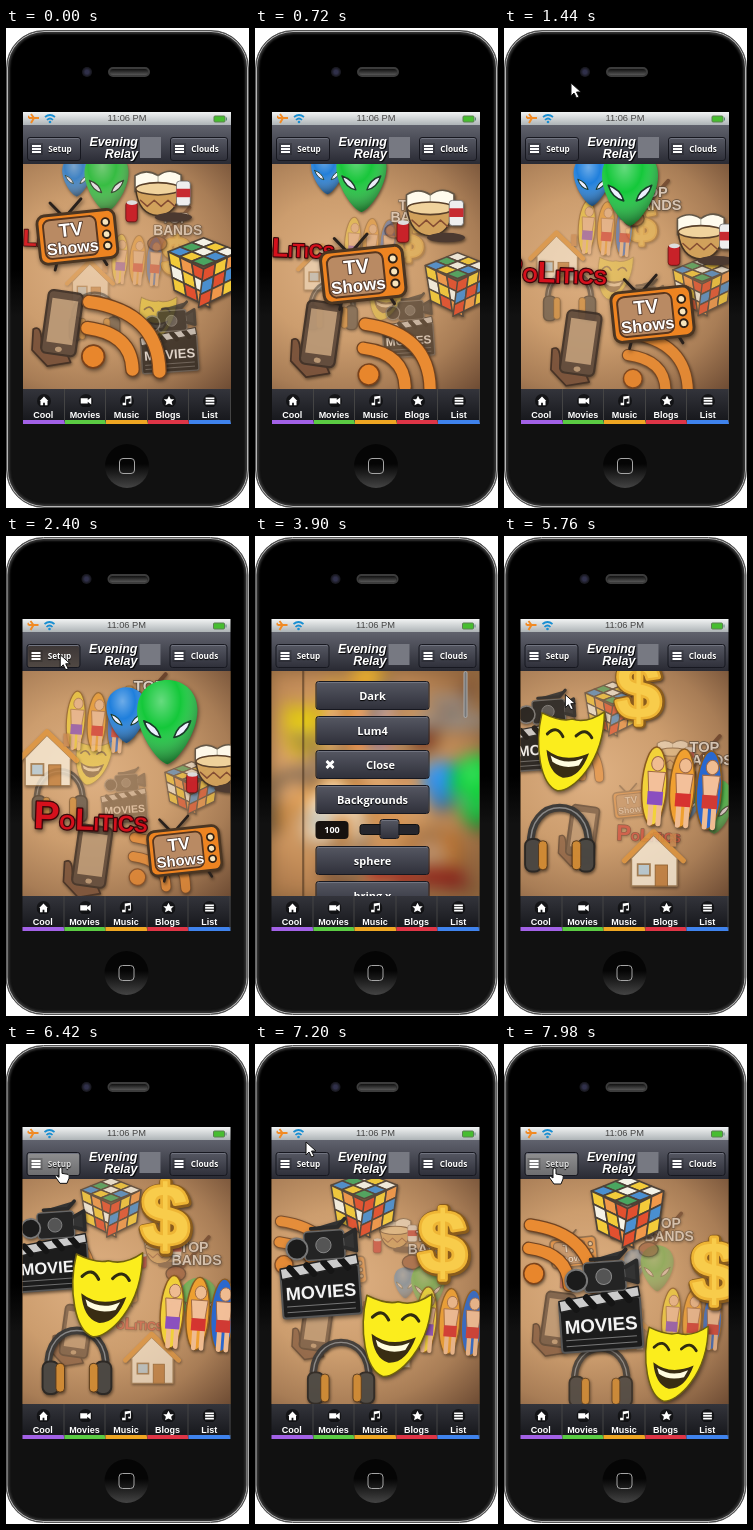
These frames come from a looping animation (243 px wide and 480 px high, 8000 ms). An HTML page:

```html
<!DOCTYPE html>
<html lang="en">
<head>
<meta charset="utf-8">
<title>Phone with icon sphere</title>
<style>
html, body { margin: 0; width: 100%; height: 100%; overflow: hidden; background: #fff; }
#stage { position: relative; width: 243px; height: 480px; overflow: hidden; background: #fff; }
#stage * { box-sizing: border-box; }
#stage div, #stage svg { position: absolute; }
#phone { inset: 0; }
.body { left: 0; top: 2px; width: 243px; height: 478px; border-radius: 38px; background: linear-gradient(#000 50%, #111 60%);
  border: 1px solid #555; box-shadow: inset 0 0 0 1px #b5b5b5, inset 0 0 2px 3px #333; }
.camera { left: 76px; top: 39px; width: 10px; height: 10px; border-radius: 50%; background: radial-gradient(#30304a 25%, #191921 60%); }
.speaker { left: 102px; top: 39px; width: 42px; height: 10px; border-radius: 5px; background: linear-gradient(#111, #555); border: 2px solid #3c3c3c; }
.home { left: 99px; top: 416px; width: 44px; height: 44px; border-radius: 50%; background: linear-gradient(#050505 45%, #444); }
.home div { left: 14px; top: 14px; width: 16px; height: 16px; border: 1.5px solid #a5a5a5; border-radius: 4px; }
.status { left: 17px; top: 84px; width: 208px; height: 13px; background: linear-gradient(#f1f3f3, #aeb4b7);
  font: 9.3px/13px "Liberation Sans", Arial, sans-serif; text-align: center; color: #444; }
.head { left: 17px; top: 97px; width: 208px; height: 39px; background: linear-gradient(#60626d, #292a33); }
.btn { border: 1px solid #171820; border-radius: 3px; background: linear-gradient(#555762, #30313b);
  box-shadow: inset 0 1px #717480; color: #fff; text-align: center; font: 700 11px/27px "Open Sans", sans-serif; text-shadow: 0 1px 1px #000; }
.top { top: 109px; height: 24px; font-size: 8.2px; line-height: 22px; padding-left: 12px; }
.top::before { content: ""; position: absolute; left: 4px; top: 7px; width: 9px; height: 8px;
  background: repeating-linear-gradient(#fff 0 2px, transparent 2px 3px); box-shadow: 0 0 0 2px #0003; }
.top.press { background: linear-gradient(#3d3737, #504843); }
.top.hover { background: linear-gradient(#8f8f90, #6e6e70); color: #ddd; }
.title { font: italic 700 12.5px/12px "Liberation Sans", Arial, sans-serif; color: #fff; text-align: right; text-shadow: 1px 1px 1px #000; }
.mark { left: 134px; top: 109px; width: 21px; height: 21px; background: #777982; }
#view { left: 17px; top: 136px; width: 208px; height: 225px; overflow: hidden; background: #8f683f; }
#world { inset: 0; background: radial-gradient(ellipse at 34% 46%, #dfb183 0, #cc9d6e 42%, #a87d56 72%, #6e4c34 100%); }
#world svg { left: 0; top: 0; width: 1px; height: 1px; overflow: visible; }
#menu { inset: 0; }
#menu .btn { left: 44px; width: 114px; height: 29px; }
.edge { left: 31px; top: 0; width: 1px; height: 225px; background: #4a321f; box-shadow: 1px 0 1px #0004; }
.bar { left: 192px; top: 0; width: 4px; height: 47px; border-radius: 2px; background: #777; border: 1px solid #aaa; }
.value { left: 44px; top: 150px; width: 33px; height: 18px; border-radius: 4px; background: #17120f; color: #fff; text-align: center; font: 700 9px/18px "Open Sans", sans-serif; }
.track { left: 88px; top: 153px; width: 60px; height: 11px; border-radius: 3px; background: #25262d; border: 1px solid #111; }
#menu .thumb { left: 108px; top: 148px; width: 20px; height: 20px; }
.foot { left: 17px; top: 361px; width: 208px; height: 35px; background: linear-gradient(#33343b, #141519); display: flex; }
#stage .tab { position: relative; width: 20%; height: 35px; border-bottom: 4px solid; border-right: 1px solid #444;
  font: 700 9px/10px "Liberation Sans", Arial, sans-serif; text-align: center; padding-top: 21px; }
.tab span { color: #fff; }
.tab svg { left: 14px; top: 4px; width: 14px; height: 14px; }
#cursor { left: 0; top: 0; width: 20px; height: 22px; overflow: visible; z-index: 9; }
</style>
</head>
<body>
<div id="stage">
  <div id="phone">
    <div class="body"></div><div class="camera"></div><div class="speaker"></div>
    <div class="home"><div></div></div>
    <div class="status">11:06 PM
      <svg style="left:5px;top:1px" width="200" height="11" fill="none">
        <path d="M1 5H11M6 5 3 1M6 5 3 10M1 5 0 3" stroke="#f18a24" stroke-width="2"/>
        <path d="M17 4Q22 0 27 4M19 7Q22 4 25 7" stroke="#188ed2" stroke-width="1.7"/><circle cx="22" cy="9" r="1.3" fill="#188ed2"/>
        <rect x="186" y="3" width="11" height="6" rx="1" fill="#47bd30" stroke="#5a8050"/><path d="M198.500 4.500v3" stroke="#587"/>
      </svg>
    </div>
    <div class="head"></div>
    <div class="btn top" id="setup" style="left:21px;width:54px">Setup</div>
    <div class="btn top" style="left:164px;width:58px">Clouds</div>
    <div class="title" style="left:76px;top:108px;width:56px">Evening<br>Relay</div>
    <div class="mark"></div>
    <div id="view">
      <div id="world"></div>
      <div id="menu">
        <div class="edge"></div><div class="bar"></div>
        <div class="value">100</div><div class="track"></div><div class="btn thumb"></div>
      </div>
    </div>
    <div class="foot" id="tabs"></div>
  </div>
  <svg width="0" height="0"><radialGradient id="shade" cx=".4" cy=".25" r=".8">
    <stop offset="0" stop-color="#fff" stop-opacity=".35"/><stop offset=".4" stop-color="#fff" stop-opacity="0"/>
    <stop offset="1" stop-opacity=".6"/></radialGradient></svg>
  <svg id="cursor"><path id="arrow" d="M0 0V13L3 10 5.500 15 8 14 5.500 9H10Z" fill="#fff" stroke="#111"/>
    <path id="hand" d="M-1 1Q1-1 2 1V6L8 7Q10 8 9 11L7 16H0L-5 9Q-4 7-1 10Z" fill="#fff" stroke="#111"/></svg>
</div>
<script>
const $ = id => document.getElementById(id);
const LOOP = 8000, STEP = 60, RADIUS = 95, DEPTH = 285;

const path = (d, fill, stroke = 'none', w = 1) =>
  `<path d="${d}" fill="${fill}" stroke="${stroke}" stroke-width="${w}" stroke-linejoin="round" stroke-linecap="round"/>`;
const oval = (x, y, rx, ry, fill, stroke = 'none', w = 1) =>
  `<ellipse cx="${x}" cy="${y}" rx="${rx}" ry="${ry}" fill="${fill}" stroke="${stroke}" stroke-width="${w}"/>`;
const box = (x, y, w, h, fill, stroke = 'none', sw = 1, r = 0) =>
  `<rect x="${x}" y="${y}" width="${w}" height="${h}" rx="${r}" fill="${fill}" stroke="${stroke}" stroke-width="${sw}"/>`;
const text = (x, y, size, fill, str, stroke = '#222', w = 2) =>
  `<text x="${x}" y="${y}" text-anchor="middle" font-family="Liberation Sans, Arial, sans-serif" font-weight="700" font-size="${size}" fill="${fill}" stroke="${stroke}" stroke-width="${w}" paint-order="stroke" stroke-linejoin="round">${str}</text>`;
const pose = (deg, size, body) => `<g transform="rotate(${deg}) scale(${size})">${body}</g>`;

// One cube side of 3 by 3 tiles, spanned by two edge vectors.
function side(x, y, ax, ay, bx, by, shift) {
  const tints = ['#f4f2e6', '#e2502f', '#4aa560', '#f3cb3a', '#4a8fd0', '#f0984a'];
  const at = (i, j) => `${x + (ax * i + bx * j) / 3} ${y + (ay * i + by * j) / 3}`;
  let out = '';
  for (let i = 0; i < 3; i++) for (let j = 0; j < 3; j++)
    out += path(`M${at(i, j)}L${at(i + 1, j)} ${at(i + 1, j + 1)} ${at(i, j + 1)}Z`,
      tints[(i * 2 + j * 3 + i * j + shift) % 6], '#4d4238', 1.6);
  return out;
}

function alien(x, y, fill, size) {
  const head = 'M0 38C-10 35-28 8-27-12C-25-46 25-46 27-12C28 8 10 35 0 38Z';
  return `<g transform="translate(${x} ${y}) scale(${size})">` + path(head, fill) + path(head, 'url(#shade)') +
    path('M-21-1Q-9 3-6 14Q-17 12-21-1ZM21-1Q9 3 6 14Q17 12 21-1Z', '#eef', '#1a3a2a', 1.5) + '</g>';
}

const surfer = (x, board, shorts) => oval(x, 0, 12, 38, board, '#8a5a20', 1.5) +
  oval(x + 2, -22, 6, 7, '#f0bc91', '#a06a48') + path(`M${x - 7}-14h17l-2 20h-13Z`, '#f3c09a', '#a06a48') +
  path(`M${x - 2} 18v18M${x + 6} 18v18`, 'none', '#f0bc91', 5) + box(x - 6, 5, 15, 13, shorts);

const capitals = sizes => [...'POLITICS'].map((c, i) => `<tspan font-size="${sizes[i]}">${c}</tspan>`).join('');

const art = {
  tv: pose(-6, .95, path('M-14-24-25-38M-8-24 8-39M-24 25-27 33M24 25 28 33', 'none', '#29211c', 3) +
    box(-41, -25, 82, 51, '#ee8421', '#4a3522', 3, 8) + box(-35, -20, 56, 41, '#b98a63', '#57351e', 2, 7) +
    text(-6, -1, 20, '#fff', 'TV', '#5c4030') + text(-6, 17, 17, '#fff', 'Shows', '#5c4030') +
    [-12, 1, 13].map(y => oval(31, y, 4, 4, '#f7e5bd', '#302015', 2)).join('')),
  politics: pose(2, 1, text(0, 11, 24, '#d5101c', capitals([38, 20, 30, 18, 22, 18, 22, 20]), '#3a0709', 2.5)),
  mask: pose(10, 1, path('M-31-30Q-10-24 0-29Q16-27 31-42C40 10 12 44-2 45C-20 42-33 5-31-30Z', '#fbed1d', '#6f6010', 1.5) +
    path('M-22-10Q-14-21-6-10M7-13Q15-24 23-14', 'none', '#302c10', 3) +
    path('M-20 6Q0 17 23 2Q18 29 1 31Q-14 29-20 6Z', '#392d13') + path('M-15 11Q2 19 18 8L15 16Q0 23-12 17Z', '#fffce0')),
  cube: pose(0, 1.2, side(0, -40, -35, 14, 35, 14, 0) + side(-35, -26, 35, 17, 6, 38, 3) + side(0, -9, 35, -17, -5, 38, 1)),
  handset: pose(8, 1.1, path('M-30 8Q-20 0-18 28L12 30 18 40-8 48-28 32Z', '#775039', '#3c2a20', 2) +
    box(-18, -40, 40, 73, '#5c483a', '#3a2d25', 2.5, 6) + box(-13, -31, 30, 51, '#b99876') + oval(2, 27, 4, 3, '#b99876')),
  feed: pose(4, .92, oval(-29, 28, 13, 13, '#e8862c', '#7a421b', 2) +
    path('M-38-4Q13-1 17 40M-38-34Q42-28 48 40', 'none', '#704321', 17) +
    path('M-38-4Q13-1 17 40M-38-34Q42-28 48 40', 'none', '#e98b32', 14)),
  clapper: pose(-4, 1, box(-41, -16, 82, 52, '#1c1c1c', '#555', 2, 3) + path('M-41-16 40-26 41-16-40-5Z', '#ccc', '#222', 1.5) +
    path('M-31-16l7 9M-13-18l7 9M5-20l7 9M23-22l7 9', 'none', '#151515', 7) +
    box(-14, -53, 42, 30, '#242424', '#666', 1.5, 4) + oval(-22, -36, 11, 11, '#1b1b1b', '#777', 2) +
    path('M-6-56H22L30-64M28-46 40-52V-30L28-34', '#333', '#2a2a2a', 4) + oval(6, -38, 8, 8, '#555', '#888') +
    text(0, 17, 19, '#f4f4f4', 'MOVIES') + path('M-36 24H35M-36 30H35', 'none', '#777', 1)),
  food: pose(0, .88, path('M-30-25Q-15-35 0-25Q15-36 30-26V-4H-30Z', '#fffbed', '#635747', 2) + path('M0-25V-4', 'none', '#998') +
    path('M-29-8H29Q26 25 0 27Q-26 25-29-8Z', '#d1a15b', '#463424', 2) + oval(0, -8, 29, 8, '#f0d39d', '#59402a', 2) +
    path('M-23 7l9 8 9-8 9 8 9-8 9 8', 'none', '#854d32', 2) +
    box(24, -18, 18, 32, '#eee', '#666', 1, 4) + box(24, -8, 18, 11, '#c72b31') +
    box(-42, 9, 15, 26, '#c82229', '#611', 1, 4) + oval(-34, 10, 7, 3, '#ddd') + oval(20, 29, 24, 6, '#4b3930')),
  aliens: alien(-28, -10, '#1f7fdc', .74) + alien(13, -3, '#14c83a', 1.12),
  house: pose(0, 1.2, path('M-25-1V31H27V-1L0-27Z', '#f8ecd8', '#9a7a54', 1.5) + path('M-33 2 0-31 34 2', 'none', '#e0953c', 6) +
    box(2, 7, 14, 24, '#c48242', '#8a5a28') + box(-18, 6, 14, 13, '#b9d5e6', '#9d7a51', 2) + box(19, -29, 7, 15, '#c98850')),
  people: pose(4, 1.15, surfer(-25, '#f2d23a', '#8a4fc0') + surfer(2, '#f0a030', '#d73330') + surfer(28, '#2868d0', '#d23a34')),
  dollar: text(0, 34, 92, '#f2b526', '$', '#8a5c1c', 10) + text(-1, 33, 92, '#f8cc4b', '$', '#eeb535', 6),
  phones: pose(0, 1.15, path('M-30 8C-34-46 34-46 30 8', 'none', '#3c3a38', 8) + path('M-30 8C-34-46 34-46 30 8', 'none', '#888', 1.5) +
    box(-36, 0, 17, 34, '#4a4743', '#2a2724', 2, 7) + box(19, 0, 17, 34, '#4a4743', '#2a2724', 2, 7) +
    box(-22, 2, 9, 30, '#cf8a34', '#54371a', 1, 4) + box(13, 2, 9, 30, '#cf8a34', '#54371a', 1, 4)),
  bands: path('M-34 36 24-30', 'none', '#4d2818', 6) + oval(-30, 30, 16, 12, '#8a4a30', '#392017', 2) +
    text(0, -5, 23, '#eee', 'TOP') + text(4, 16, 23, '#eee', 'BANDS')
};

// Distance along the spin axis and phase, before and after the menu; optional orbit radius.
const orbits = {
  tv: [-5, -.49, -10, -.49], politics: [-35, -1.29, -24, -.98], mask: [-11, -3.85, -11, -3.85],
  cube: [44, .78, 44, 1.05, 66], handset: [-74, -.35, -74, -.35, 32], feed: [-34, .35, -17, .81, 78],
  clapper: [-21, 1.65, -24, 1.71, 82], food: [64, -.48, 64, -.48, 62], aliens: [43, -1.47, 43, -1.47],
  house: [-38, -2.75, -32, -1.9, 72], people: [22, -3.05, 28, -2.83, 70], dollar: [62, -3.5, 62, -4.01],
  phones: [-60, -3.29, -72, -3.45, 45], bands: [82, -3.1, 84, -1.13, 50]
};
const spin = [[0, 0], [1440, .83], [2400, 1.29], [6420, 3.73], [7980, 4.57]];
const visits = [
  [[1260, 74, 0], [1440, 67, 55], [1800, 55, 118], [2580, 54, 119], [2760, 52, 60]],
  [[4680, 76, 2], [4920, 68, 95], [5220, 75, 228], [5520, 76, 228], [5880, 54, 124],
   [6720, 54, 123], [7020, 52, 72], [7380, 50, 124], [8000, 50, 124]]
];

function along(track, t) {
  let i = 1;
  while (i < track.length - 1 && t > track[i][0]) i++;
  const [a, b] = [track[i - 1], track[i]], k = (t - a[0]) / (b[0] - a[0]);
  return a.slice(1).map((v, n) => v + (b[n + 1] - v) * k);
}
const clamp = (v, lo = 0, hi = 1) => Math.min(hi, Math.max(lo, v));

$('world').innerHTML = Object.keys(art).map(n =>
  `<svg id="${n}" style="filter:drop-shadow(1px 2px 2px #0008)">${art[n]}</svg>`).join('');
$('menu').insertAdjacentHTML('beforeend', ['Dark', 'Lum4', 'Close', 'Backgrounds', 'sphere', 'bring x'].map((name, i) =>
  `<div class="btn" style="top:${10 + 34.7 * i + (i > 3 ? 26 : 0)}px;${i === 2 ? 'padding-left:16px' : ''}">${
    i === 2 ? '<svg style="left:9px;top:9px" width="9" height="9"><path d="M1 1 8 8M8 1 1 8" stroke="#fff" stroke-width="3"/></svg>' : ''}${name}</div>`).join(''));
$('tabs').innerHTML = [
  ['Cool', '#a261e6', 'M2 7 7 2 12 7H11V12H8V9H6V12H3V7Z'],
  ['Movies', '#5bcb43', 'M1 4H9V6L13 3V11L9 8V10H1Z'],
  ['Music', '#efa622', 'M5 2 12 1V10H9V8H11V4L6 5V12H2V9H5Z'],
  ['Blogs', '#df3546', 'M7 1 9 5 13 5 10 8 11 12 7 10 3 12 4 8 1 5 5 5Z'],
  ['List', '#3f83ed', 'M2 3H12V5H2ZM2 6H12V8H2ZM2 9H12V11H2Z']
].map(([name, tint, d]) => `<div class="tab" style="border-bottom-color:${tint}"><svg viewBox="-1 -2 16 16">${
  oval(7, 7, 8, 8, '#0008') + path(d, '#fff')}</svg><span>${name}</span></div>`).join('');

function placeIcons(t) {
  const angle = along(spin, t)[0], k = clamp((t - 2700) / 2500);
  for (const name in orbits) {
    const [v0, a0, v1, a1, orbit] = orbits[name];
    const axis = v0 + (v1 - v0) * k, phase = angle + a0 + (a1 - a0) * k;
    const r = orbit || Math.sqrt(RADIUS ** 2 - axis ** 2);
    const z = r * Math.cos(phase), p = DEPTH / (DEPTH - z);
    const u = r * Math.sin(phase) * p, v = axis * p;
    const style = $(name).style;
    style.transform = `translate(${104 + (u + v) * Math.SQRT1_2}px, ${112 + (u - v) * Math.SQRT1_2}px) scale(${p / 1.42})`;
    style.opacity = clamp(.75 + .5 * z / RADIUS);
    style.zIndex = Math.round(z + 100);
  }
}

function placeCursor(t) {
  const visit = visits.find(v => t >= v[0][0] && t <= v[v.length - 1][0]);
  const [x, y] = visit ? along(visit, t) : [0, -50];
  const over = x > 20 && x < 75 && y > 108 && y < 133, hand = over && t > 5500;
  $('cursor').style.transform = `translate(${x}px, ${y}px)`;
  $('cursor').style.display = visit ? '' : 'none';
  $('arrow').style.display = hand ? 'none' : '';
  $('hand').style.display = hand ? '' : 'none';
  $('setup').className = 'btn top' + (hand ? ' hover' : over ? ' press' : '');
}

function draw(now) {
  const t = Math.floor(now % LOOP / STEP) * STEP;
  const open = t >= 2700 && t < 5460;
  placeIcons(t);
  placeCursor(t);
  $('phone').style.transform = t >= 1980 ? 'translate(-.5px, -1px)' : 'none';
  $('menu').style.display = open ? '' : 'none';
  $('world').style.filter = open ? 'blur(8px) saturate(1.2)' : 'none';
}

const start = performance.now();
function tick() {
  draw(performance.now() - start);
  requestAnimationFrame(tick);
}
tick();
</script>
</body>
</html>
```
